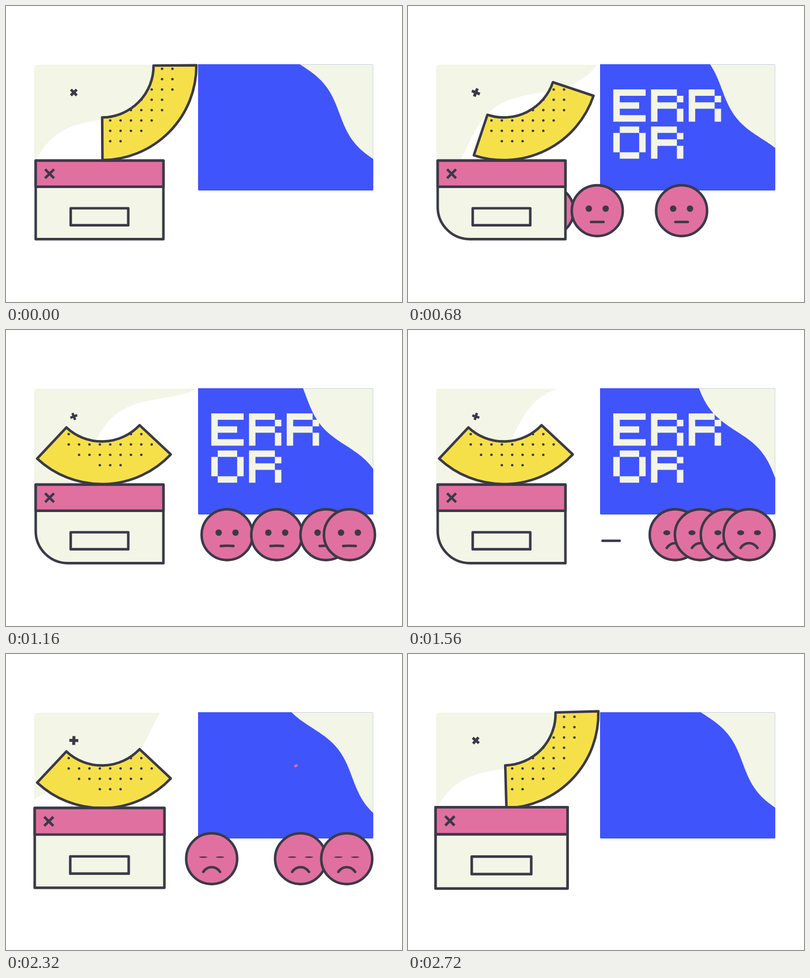
These frames come from a looping animation (800x600 px, 2.76 s). An HTML page with a canvas:

```html
<!DOCTYPE html>
<html>
<head>
<meta charset="utf-8">
<title>Error</title>
<style>
  html, body { margin: 0; overflow: hidden; background: #fff; }
  canvas { display: block; }
</style>
</head>
<body>
<canvas id="stage" width="800" height="600"></canvas>
<script>
const c = document.getElementById('stage').getContext('2d');
const LOOP = 2760, STEP = 40, TAU = Math.PI * 2, DEG = Math.PI / 180;
const CREAM = '#f3f5e6', PINK = '#e0709f', DARK = '#3a3a48', YELLOW = '#f6e04a', BLUE = '#4054fb';

const ramp = (t, from, to) => Math.min(1, Math.max(0, (t - from) / (to - from)));
const ease = (t, from, to) => { const u = ramp(t, from, to); return u * u * (3 - 2 * u); };
const bump = (t, peak, width) => Math.max(0, 1 - Math.abs(t - peak) / width);

// Resting place, start of the way out and of the way back, rightmost face first
const faces = [
  { home: 689, out: 209, back: 2310 },
  { home: 643, out: 399, back: 2222 },
  { home: 588, out: 571, back: 2090 },
  { home: 535, out: 692, back: 1845 }
];

function line(x1, y1, x2, y2) {
  c.beginPath();
  c.moveTo(x1, y1);
  c.lineTo(x2, y2);
  c.stroke();
}

function rounded(x, y, w, h, r, color) {
  c.fillStyle = color;
  c.beginPath();
  c.roundRect(x, y, w, h, r);
  c.fill();
}

function disc(x, y, rx, ry = rx) {
  c.beginPath();
  c.ellipse(x, y, rx, ry, 0, 0, TAU);
  c.fill();
}

// Fills one side of a travelling sine wave inside a clip box.
function wave(box, x, y, angle, amp, length, phase, side, color) {
  c.save();
  c.beginPath();
  c.rect(...box);
  c.clip();
  c.translate(x, y);
  c.rotate(angle * DEG);
  c.beginPath();
  for (let s = -160; s <= 460; s += 4) c.lineTo(s, -amp * Math.cos(TAU * (s / length + phase)));
  c.lineTo(460, side * 400);
  c.lineTo(-160, side * 400);
  c.fillStyle = color;
  c.fill();
  c.restore();
}

function drawPanels(t) {
  rounded(57, 119, 331, 196, [5, 0, 0, 0], CREAM);
  wave([57, 118, 332, 198], 74.4, 319.2, -36.9, 30, 365, -.156 - t / LOOP, 1, '#fff');
  rounded(388, 118, 354, 256, [0, 2, 2, 2], BLUE);
  wave([388, 118.35, 353.8, 255], 594, 119, 51.2, 13.5, 257, -.245 + t / LOOP, -1, CREAM);
}

const glyphs = {
  E: ['#####', '#....', '####.', '#....', '#####'],
  R: ['####.', '#...#', '####.', '#...#', '#...#'],
  O: ['.###.', '#...#', '#...#', '#...#', '.###.']
};

function drawText(t) {
  const glitch = t >= 800 && t < 960;
  c.fillStyle = CREAM;
  c.beginPath();
  if (t < 2200) [...'ERROR'].forEach((letter, i) => {
    if (t < 120 + i * 50) return;
    const x = 414.7 + i % 3 * 76.2, y = i < 3 ? 169 : 244.2;
    glyphs[letter].forEach((row, r) => [...row].forEach((cell, k) => {
      const shift = glitch && i < 3 && r === 4 ? -4 : 0;
      if (cell === '#') c.rect(x + k * 13.08 + shift, y + r * 13.08, 13.08, 13.08);
    }));
  });
  if (glitch) {
    c.rect(394, 137.5, 12, 12);
    c.rect(607, 264, 72, 6.5);
    c.rect(400, 323, 49, 6);
  }
  c.fill();

  // Strike that wipes the word away
  const head = ramp(t, 1960, 2090), tail = ramp(t, 2080, 2330);
  if (head > tail) {
    c.strokeStyle = PINK;
    line(630 - 45 * tail, 204 + 23 * tail, 630 - 45 * head, 204 + 23 * head);
  }
}

function drawCross(t) {
  const s = .9 + .1 * Math.cos(TAU * (t - 400) / 1920);
  c.save();
  c.translate(137, 175.3);
  c.rotate((45 + 270 * t / LOOP) * DEG);
  c.scale(s, s);
  c.fillStyle = DARK;
  c.fillRect(-9, -3, 18, 6);
  c.fillRect(-3, -9, 6, 18);
  c.restore();
}

function drawRing(t) {
  const tipped = ease(t, 380, 1040) - ease(t, 2320, 2680);
  const wobble = (1 - tipped) * Math.sin(TAU * (t + 40) / 220);
  const a = (-1.3 + 44.5 * tipped + wobble) * DEG, b = a + 90 * DEG;
  const ring = new Path2D();
  ring.arc(193.6, 121.4, 191, a, b);
  ring.arc(193.6, 121.4, 104.5, b, a, true);
  ring.closePath();
  c.save();
  c.fillStyle = YELLOW;
  c.fill(ring);
  c.clip(ring);
  c.fillStyle = DARK;
  for (let x = -6; x <= 6; x++)
    for (let y = -1; y <= 6; y++)
      if (Math.hypot(x, y) * 20.95 < 130) disc(210.5 + x * 20.95, 148.2 + y * 20.95, 2.5);
  c.restore();
  c.strokeStyle = DARK;
  c.stroke(ring);
}

function drawFace(x, t) {
  const blink = Math.max(bump(t, 1630, 100), bump(t, 2320, 100));
  const sad = ease(t, 1120, 1440);
  c.save();
  c.translate(x, 414.9);
  c.fillStyle = PINK;
  c.strokeStyle = DARK;
  disc(0, 0, 51.5);
  c.stroke();
  c.fillStyle = DARK;
  for (const side of [-17, 17]) disc(side, -4.2 + blink, 6.5 + 2 * blink, 6.5 - 5 * blink);
  const w = 12.5 + 4.5 * sad, end = 22.8 + 4 * sad;
  c.beginPath();
  c.moveTo(-w, end);
  c.bezierCurveTo(-w / 2, end - 13 * sad, w / 2, end - 13 * sad, w, end);
  c.stroke();
  c.restore();
}

function drawFaces(t) {
  for (const { home, out, back } of [...faces].reverse()) {
    const way = ease(t, out, out + 758) + .018 * bump(t, out + 870, 220) - ease(t, back, back + 440);
    if (way > 0) drawFace(265 + (home - 265) * way, t);
  }
  const u = ramp(t, 1480, 1640);
  if (u > 0 && u < 1) line(470 - 154 * u, 427.3, 470 - 170 * u * u, 427.3);
}

function drawWindow(t) {
  // Swells while the faces return, with a pulse for each one swallowed
  const pulse = Math.max(...faces.map(f => bump(t, f.back + 380, 100)));
  const s = 1 + .014 * (ease(t, 1720, 2020) - ramp(t, 2720, 2760)) + .028 * pulse;
  const corner = [0, 0, 0, 65 * (ease(t, 120, 620) - ease(t, 1840, 2320))];
  c.save();
  c.translate(188.9, 393);
  c.scale(s, s);
  c.translate(-188.9, -393);
  c.strokeStyle = DARK;
  rounded(60, 313.4, 258, 159.2, corner, CREAM);
  c.stroke();
  c.fillStyle = PINK;
  c.fillRect(60, 313.4, 258, 53);
  c.strokeRect(60, 313.4, 258, 53);
  c.strokeRect(130.7, 410, 116.3, 34.4);
  c.lineCap = 'butt';
  line(79, 331, 97, 349);
  line(97, 331, 79, 349);
  c.restore();
}

function draw() {
  const t = Math.floor(performance.now() / STEP) * STEP % LOOP;
  c.fillStyle = '#fff';
  c.fillRect(0, 0, 800, 600);
  c.lineWidth = 5.1;
  c.lineJoin = c.lineCap = 'round';
  drawPanels(t);
  drawText(t);
  drawCross(t);
  drawRing(t);
  drawFaces(t);
  drawWindow(t);
  requestAnimationFrame(draw);
}
draw();
</script>
</body>
</html>
```
